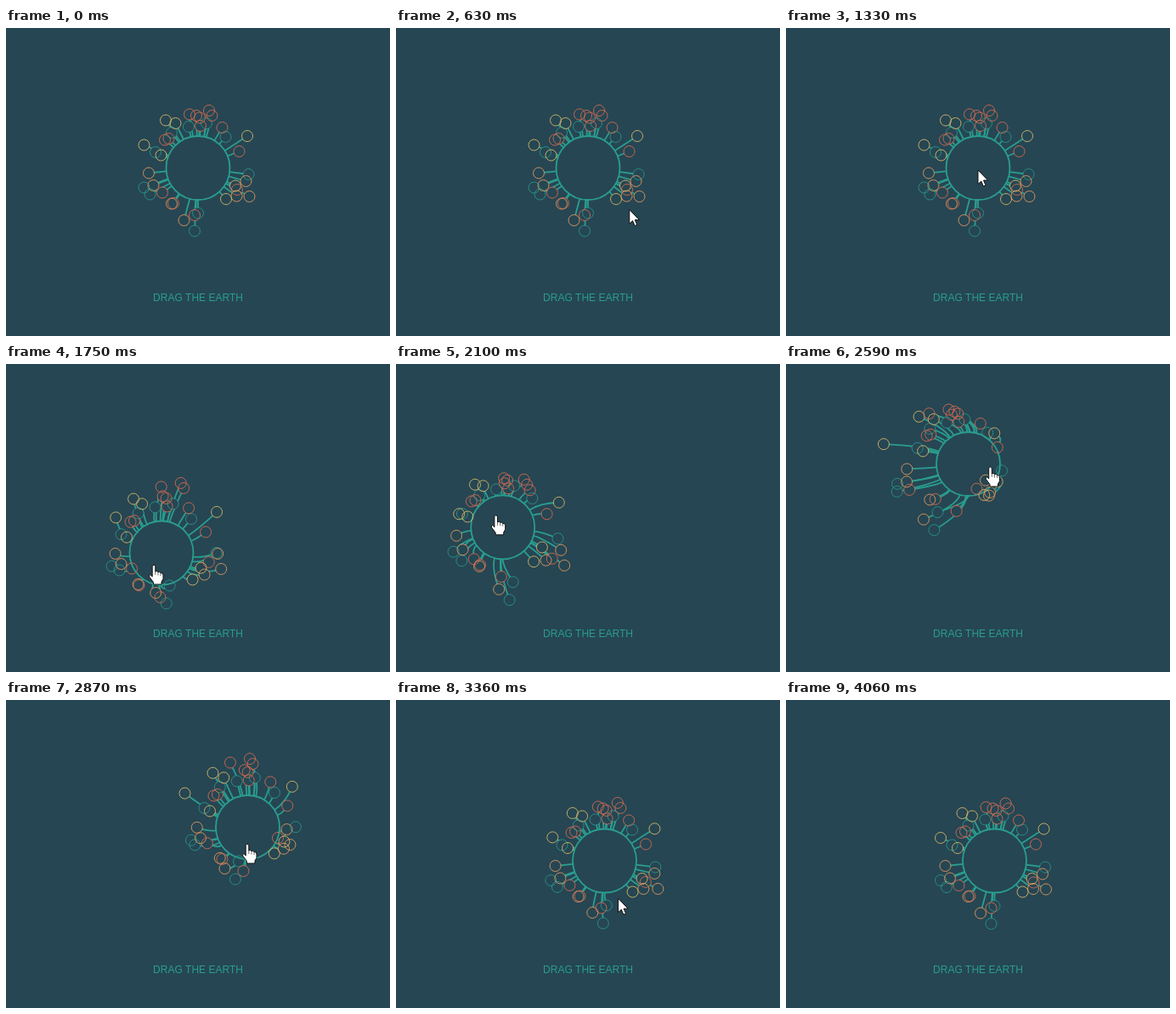
An HTML page with a canvas for the animation above (4.13 s loop, 452 by 362 pixels).

```html
<!DOCTYPE html>
<html>
<head>
<meta charset="utf-8">
<style>
  html, body { margin: 0; width: 100%; height: 100%; overflow: hidden; background: #264653; }
  canvas { display: block; }
</style>
</head>
<body>
<canvas id="stage" width="452" height="362"></canvas>
<script>
const ctx = document.getElementById('stage').getContext('2d');
const LOOP = 4130, TICK = 70, RADIUS = 37.5, HEAD = 6.5;
const BACK = '#264653', TEAL = '#2a9d8f';

// Each tree: head offset from the earth's centre and softness (1 stiff, 5 loose)
const forest = {
  [TEAL]: [
    [-31, -41.5, 2], [-11, -48.5, 2], [10, -52.5, 2], [32.5, -36.5, 1], [-50, -18.5, 1],
    [-63.5, 23, 3], [-56.5, 31, 4], [0, 53, 5], [-4, 74, 5], [59.5, 7.5, 3]
  ],
  '#e9c46a': [
    [-38, -56, 3], [-26.5, -52.5, 2], [58, -37.5, 4], [-63.5, -27, 5],
    [-43.5, -15, 1], [44, 21, 1], [33, 36.5, 2]
  ],
  '#f4a261': [
    [-58, 6, 2], [-52.5, 20.5, 3], [-31, 42, 2], [-16.5, 61.5, 5],
    [56.5, 15.5, 5], [45.5, 33, 3], [60.5, 33.5, 5]
  ],
  '#e76f51': [
    [-39, -33, 1], [-34.5, -34.5, 1], [-10, -63, 5], [-2, -61.5, 2], [13, -67.5, 5],
    [16.5, -61.5, 5], [2, -59, 2], [3, -49.5, 2], [28.5, -47.5, 2], [48.5, -19.5, 2],
    [-42, 29, 4], [-29, 41.5, 1], [-4, 55.5, 1], [46, 25.5, 5]
  ]
};
const trees = Object.entries(forest).flatMap(([color, list]) =>
  list.map(([x, y, soft]) => ({ x, y, soft, color })));

// Smooth paths, one point every STEP ms from GRAB on
const GRAB = 1330, STEP = 140;
const earthPath = [
  [226, 164.5], [219, 172], [200, 194], [183, 222], [165, 228], [134, 201], [119, 182.5],
  [101, 152], [147, 122], [214.5, 117.5], [269, 125], [284.5, 149.5], [281, 177],
  [254, 187], [245.5, 189]
];
const dragPath = [
  [226, 167], [212, 180], [192, 207], [174, 236], [157, 236], [130, 198], [108, 160],
  [102, 141], [185, 121], [240.5, 121], [279, 134], [284, 169], [272, 186],
  [247, 191], [251, 190], [278, 328], [330, 740]
];

function along(path, t) {
  const last = path.length - 1;
  const s = Math.min(Math.max((t - GRAB) / STEP, 0), last);
  const i = Math.floor(s), u = s - i;
  const at = k => path[Math.min(Math.max(k, 0), last)];
  return [0, 1].map(d => {
    const [a, b, c, e] = [at(i - 1)[d], at(i)[d], at(i + 1)[d], at(i + 2)[d]];
    return b + u / 2 * (c - a + u * (2 * a - 5 * b + 4 * c - e + u * (3 * (b - c) + e - a)));
  });
}

// Earth position with exponential lag: average of its past, weighted by age
function trailing(t, tau) {
  const n = 40;
  let x = 0, y = 0;
  for (let i = 0; i < n; i++) {
    const p = along(earthPath, t + tau * Math.log((i + 0.5) / n));
    x += p[0] / n;
    y += p[1] / n;
  }
  return [x, y];
}

function circle(x, y, r) {
  ctx.beginPath();
  ctx.arc(x, y, r, 0, 2 * Math.PI);
}

function drawStalk(tree, ex, ey, hx, hy) {
  const dist = Math.hypot(tree.x, tree.y);
  const nx = tree.x / dist, ny = tree.y / dist;
  const bend = (RADIUS + dist) / 2;
  ctx.beginPath();
  ctx.moveTo(ex + nx * RADIUS, ey + ny * RADIUS);
  ctx.quadraticCurveTo(ex + nx * bend, ey + ny * bend, hx, hy);
  ctx.stroke();
}

const arrow = new Path2D('M0 0V16.5L3.8 13 6.3 19 9 17.8 6.5 12H11.6Z');
const hand = new Path2D('M-1.8 1.5Q0-1.5 1.8 1.5V8Q3.6 6.6 5 8.6 6.8 7.6 8 9.6 ' +
  '10.8 9 11 12V16.5L9 20V23H-.5V20.5L-5 14.5Q-6 11-3.4 12L-1.8 14Z');
const knuckles = new Path2D('M1.8 8V12M5 8.6V12.5M8 9.6V13');

function cursorAt(t) {
  if (t < 770) {
    const p = 1 - (1 - (t - 490) / 280) ** 2;
    return [394 - 159 * p, 335 - 162 * p];
  }
  if (t < 1120) return [235, 173];
  return t < GRAB ? [230, 165] : along(dragPath, t);
}

function drawCursor(t) {
  if (t < 490 || t >= 3500) return;
  const dragging = t > GRAB && t < 3220;
  const shape = dragging ? hand : arrow;
  ctx.save();
  ctx.translate(...cursorAt(t));
  ctx.lineWidth = 1;
  ctx.fillStyle = '#fff';
  ctx.strokeStyle = '#111';
  ctx.fill(shape);
  ctx.stroke(shape);
  if (dragging) {
    ctx.lineWidth = 0.6;
    ctx.stroke(knuckles);
  }
  ctx.restore();
}

function draw(t) {
  ctx.fillStyle = BACK;
  ctx.fillRect(0, 0, 452, 362);

  const [ex, ey] = along(earthPath, t);
  const sway = [0, 21, 30, 42, 58, 80].map(tau => trailing(t, tau));
  const heads = trees.map(({ x, y, soft }) => [x + sway[soft][0], y + sway[soft][1]]);

  ctx.strokeStyle = TEAL;
  ctx.lineWidth = 1.8;
  trees.forEach((tree, i) => drawStalk(tree, ex, ey, ...heads[i]));
  for (const [x, y] of heads) {
    circle(x, y, HEAD);
    ctx.fill();
  }
  circle(ex, ey, RADIUS);
  ctx.fill();
  ctx.stroke();

  ctx.lineWidth = 1;
  ctx.globalAlpha = 0.8;
  trees.forEach((tree, i) => {
    circle(...heads[i], HEAD);
    ctx.strokeStyle = tree.color;
    ctx.stroke();
  });
  ctx.globalAlpha = 1;

  ctx.fillStyle = TEAL;
  ctx.font = '12px "Liberation Sans", Arial, sans-serif';
  ctx.textAlign = 'center';
  ctx.fillText('DRAG THE EARTH', 226, 321);
  drawCursor(t);
}

const start = performance.now();
function frame() {
  const t = (performance.now() - start) % LOOP;
  draw(Math.floor(t / TICK) * TICK);
  requestAnimationFrame(frame);
}
frame();
</script>
</body>
</html>
```
